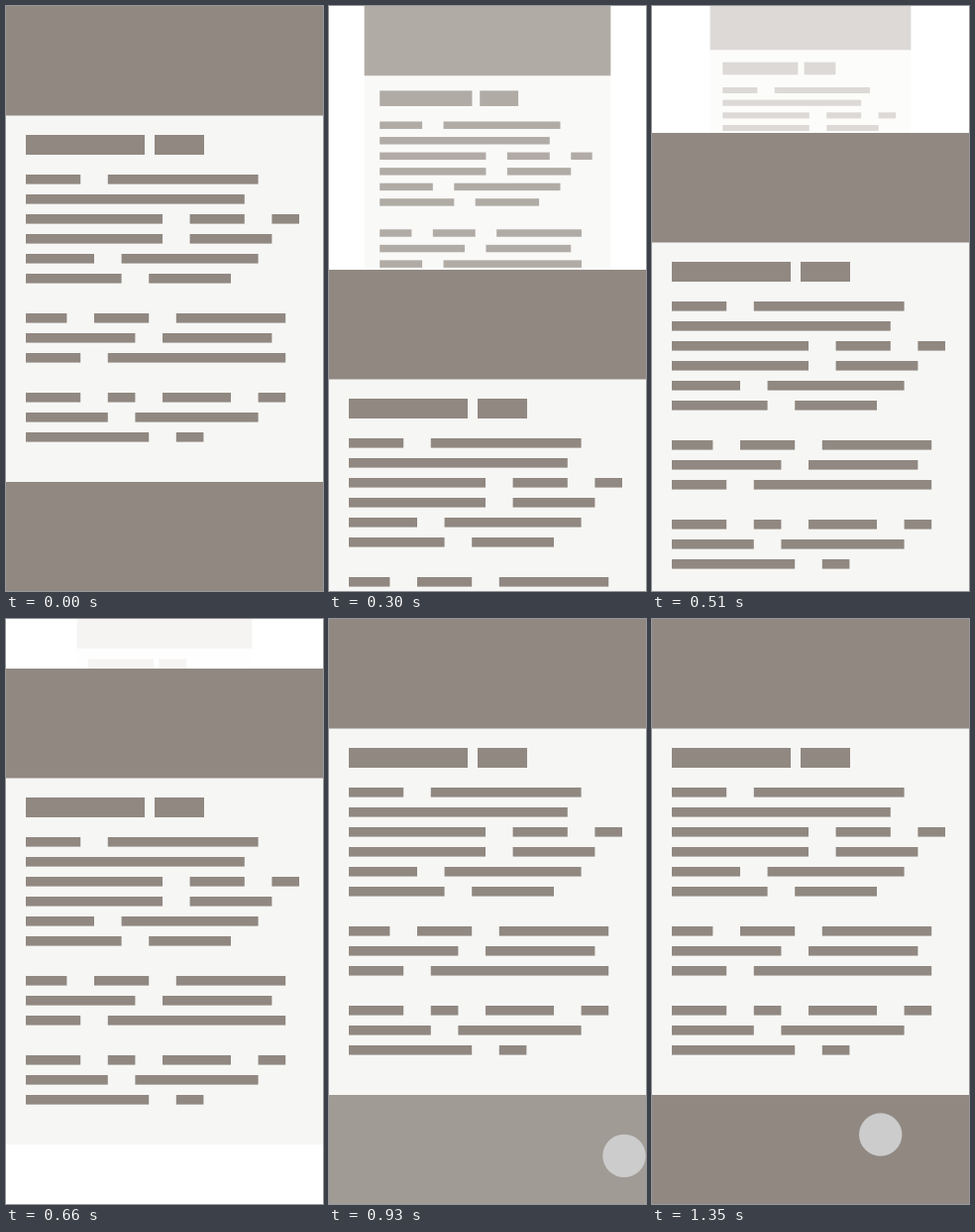
Write an HTML page with a canvas that moves like this. It is 320 px wide and 590 px high and loops after 1380 ms.

```html
<!DOCTYPE html>
<html lang="en">
<head>
<meta charset="utf-8">
<title>Next article transition</title>
<style>
  html, body { margin: 0; width: 100%; height: 100%; overflow: hidden; background: #fff; }
  canvas { display: block; }
</style>
</head>
<body>
<canvas id="stage" width="320" height="590"></canvas>
<script>
const ctx = document.getElementById('stage').getContext('2d');
const LOOP = 1380, STEP = 30;
const INK = '#908881', PAPER = '#f6f6f4', DOT = '#cccccc';
const FOLD = 480, HEADER = 110.5, UNIT = 13.8;

// Word lengths per line, in character units; words are two units apart.
const LINES = [
  [4, 11], [16], [10, 4, 2], [10, 6], [5, 10], [7, 6], [],
  [3, 4, 8], [8, 8], [4, 13], [],
  [4, 2, 5, 2], [6, 9], [9, 2]
];

// Rise of the incoming page: time, top edge, velocity.
const RISE = [
  [0, 480, -.64], [120, 398, -.72], [300, 266, -.70],
  [510, 128, -.58], [780, 11, -.20], [890, 0, 0]
];

const clamp = x => Math.min(1, Math.max(0, x));
const easeSine = x => (1 - Math.cos(Math.PI * clamp(x))) / 2;

function riseAt(t) {
  const i = RISE.findIndex(key => key[0] > t);
  if (i < 0) return 0;
  const [t0, y0, v0] = RISE[i - 1], [t1, y1, v1] = RISE[i];
  const d = t1 - t0, u = (t - t0) / d, w = 1 - u;
  return w * w * ((1 + 2 * u) * y0 + u * d * v0) + u * u * ((1 + 2 * w) * y1 - w * d * v1);
}

function rect(color, x, y, w, h) {
  ctx.fillStyle = color;
  ctx.fillRect(x, y, w, h);
}

function drawPage(x, y, scale) {
  ctx.save();
  ctx.translate(x, y);
  ctx.scale(scale, scale);
  rect(PAPER, 0, 0, 320, FOLD);
  rect(INK, 0, 0, 320, HEADER);
  rect(INK, 20, 130, 120, 20);
  rect(INK, 150, 130, 50, 20);
  LINES.forEach((words, row) => {
    let left = 20;
    for (const length of words) {
      rect(INK, left, 170 + row * 20, length * UNIT, 9.6);
      left += (length + 2) * UNIT;
    }
  });
  ctx.restore();
}

function draw(t) {
  const top = riseAt(t), progress = 1 - top / FOLD;
  rect('#fff', 0, 0, 320, 590);

  // Outgoing page shrinks and fades to white.
  const scale = 1 - progress / 2;
  drawPage(160 * (1 - scale), -35 * progress, scale);
  ctx.globalAlpha = easeSine(t / 825);
  rect('#fff', 0, 0, 320, 590);
  ctx.globalAlpha = 1;

  drawPage(0, top, 1);

  // Header of the following page fades in below the fold.
  ctx.globalAlpha = easeSine((t - 708) / 301);
  rect(INK, 0, FOLD, 320, 110);
  ctx.globalAlpha = 1;

  // Touch point slides in from the right.
  const away = Math.max(0, (1295 - t) / 365) ** 3;
  ctx.fillStyle = DOT;
  ctx.beginPath();
  ctx.arc(230.7 + 67.3 * away, 520 + 21.4 * away, 21.7, 0, Math.PI * 2);
  ctx.fill();
}

const start = performance.now();
function tick() {
  const t = (performance.now() - start) % LOOP;
  draw(Math.floor(t / STEP) * STEP);
  requestAnimationFrame(tick);
}
tick();
</script>
</body>
</html>
```
